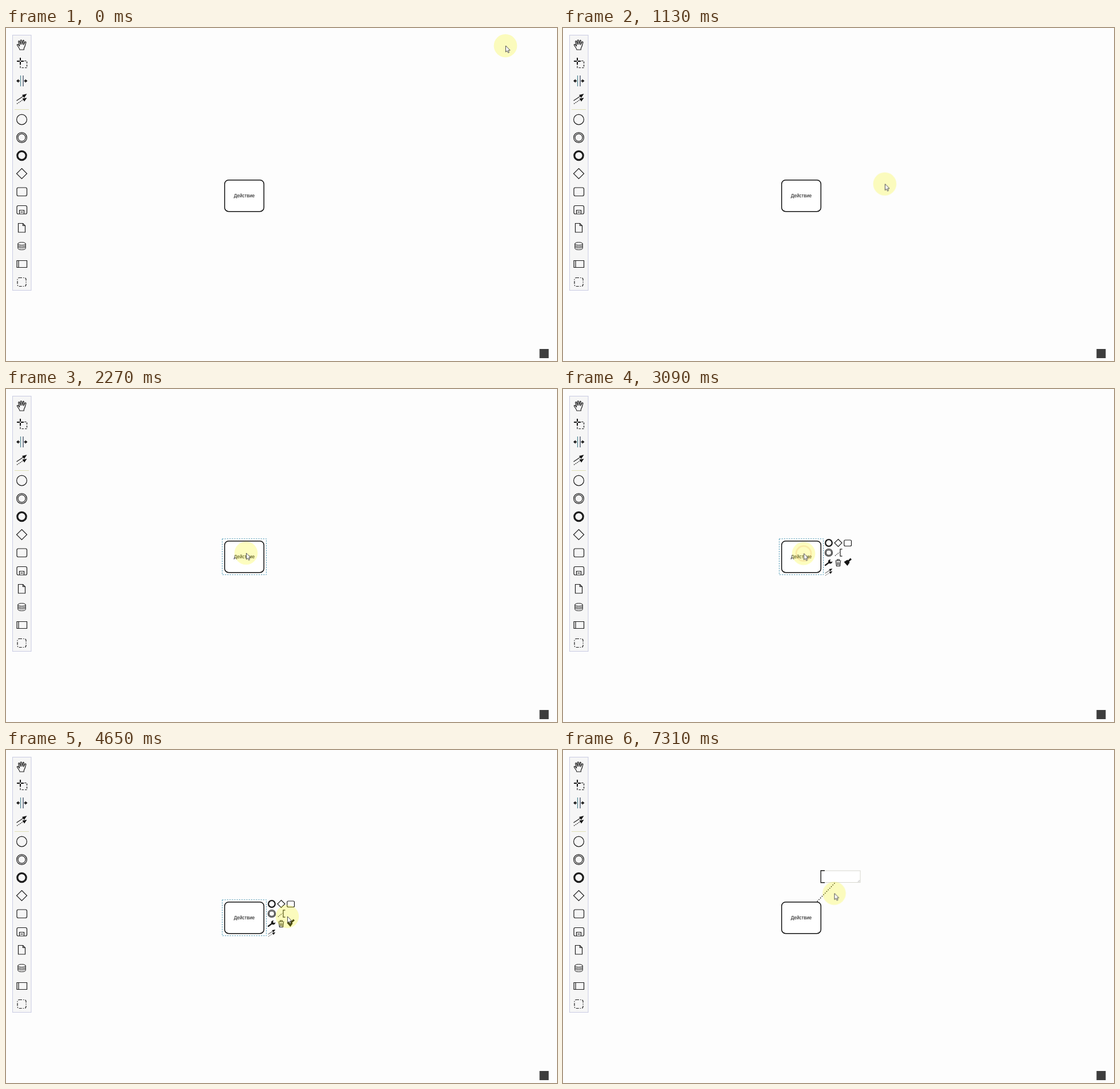
Animation of 962x582 px, one loop 8 s. Source, as an HTML page:

```html
<!DOCTYPE html>
<html lang="ru">
<head>
<meta charset="utf-8">
<title>Диаграмма процесса</title>
<style>
html, body { margin: 0; width: 100%; height: 100%; overflow: hidden; background: #fdfdfd; }
svg { display: block; width: 100%; height: 100%; }
.line { fill: none; stroke: #1c1c1c; stroke-width: 1.2; }
.solid { fill: #151515; stroke: none; }
.label { font: 8.3px "Liberation Sans", Arial, sans-serif; text-anchor: middle; fill: #111; }

#outline, #pad, #note, #caret { animation: 8s step-end infinite; }
#outline { animation-name: outline; }
#pad { animation-name: pad; }
#note { animation-name: note; }
#caret { animation-name: caret; }
#pointer { animation: move 8s linear infinite; }
#ring { animation: click 8s linear infinite; }

@keyframes outline {
  0%, 100% { visibility: hidden; }
  20.625% { visibility: visible; }
  71.25% { visibility: hidden; }
}
@keyframes pad {
  0%, 100% { visibility: hidden; }
  33.125% { visibility: visible; }
  71.25% { visibility: hidden; }
}
@keyframes note {
  0%, 100% { visibility: hidden; }
  71.25% { visibility: visible; }
}
@keyframes caret {
  0%, 100% { opacity: 0; }
  71.25% { opacity: 1; }
  77.9% { opacity: 0; }
  84.5% { opacity: 1; }
  91.1% { opacity: 0; }
}
@keyframes move {
  0%, 3.625% { transform: translate(872px, 31px); }
  5.625% { transform: translate(826px, 104px); }
  7.5% { transform: translate(738px, 207px); }
  9.125%, 10.375% { transform: translate(675px, 256.5px); }
  11.5% { transform: translate(612px, 271px); }
  12.625%, 13.875% { transform: translate(566px, 272px); }
  16.25% { transform: translate(528px, 277px); }
  18.75% { transform: translate(480px, 284px); }
  20.875% { transform: translate(451px, 286.5px); }
  23.125%, 24.375% { transform: translate(435.5px, 283px); }
  26.875% { transform: translate(418px, 286px); }
  29.875%, 38.625% { transform: translate(420px, 287.5px); }
  41.25% { transform: translate(440px, 285px); }
  44.375% { transform: translate(478px, 282px); }
  47.625%, 48.875% { transform: translate(494px, 284px); }
  53.125% { transform: translate(506px, 290px); }
  58.125%, 59.375% { transform: translate(491px, 291px); }
  61.875% { transform: translate(489px, 293px); }
  65% { transform: translate(482px, 287px); }
  68.625%, 80.375% { transform: translate(486px, 290px); }
  83.75% { transform: translate(483px, 272px); }
  89.625%, 90.875% { transform: translate(477px, 251px); }
  91.375%, 100% { transform: translate(473.5px, 250.5px); }
}
@keyframes click {
  0%, 31.6% { transform: scale(.3); opacity: 0; }
  31.7% { transform: scale(.3); opacity: 1; }
  35.5% { transform: scale(1); opacity: 1; }
  38.7% { transform: scale(1); opacity: .8; }
  39.2% { transform: scale(1); opacity: 0; }
  39.3%, 70.1% { transform: scale(.3); opacity: 0; }
  70.2% { transform: scale(.3); opacity: 1; }
  74% { transform: scale(1); opacity: 1; }
  78.6% { transform: scale(1); opacity: .8; }
  79.1%, 100% { transform: scale(1); opacity: 0; }
}
</style>
</head>
<body>
<svg viewBox="0 0 962 582" xmlns="http://www.w3.org/2000/svg">
  <defs>
    <g id="links">
      <path class="line" d="M-9 3L3-5"/>
      <path class="line" stroke-dasharray="1.8 1.4" d="M-8.500 8.500L3 1"/>
      <path class="solid" d="M9-9L4.200-1.700L.5-7zM9-2L4.500 4.500L1-.7z"/>
    </g>
  </defs>

  <g id="palette">
    <rect x="11.500" y="12.500" width="32.500" height="446" fill="#f6f6f6" stroke="#c9cbe2"/>
    <path d="M15 142.500H40" stroke="#dfdfb6"/>

    <g transform="translate(27.5 29.5)">
      <path class="line" stroke-linejoin="round" stroke-width="1" d="M-3.500 8.500C-4 5.500-6.500 3-8 .5C-8.500-1-6.800-1.500-5.800-.2L-3.800 2L-5.800-5.500C-6-7.300-4.300-7.500-3.800-6L-2-.8L-2.200-7.300C-2-9-.3-9-.1-7.300L.5-1L2-7.200C2.500-8.700 4-8.300 3.800-6.700L3-.3L5.500-4.800C6.500-6.200 8-5.200 7.300-3.700C6-.5 6 3 4 5.500L3.700 8.500z"/>
    </g>
    <path d="M25 52V64M19 58H31" stroke="#151515" stroke-width="2"/>
    <rect x="24" y="57" width="2" height="2" fill="#f6f6f6"/>
    <path class="line" stroke-dasharray="3.500 2" d="M32 57.500H36.500V69.500H25V63"/>
    <path d="M25.500 83V102" stroke="#4b8290" stroke-width="1.200"/>
    <path d="M30 83V102" stroke="#303d58" stroke-width="1.200"/>
    <path class="solid" d="M18 92.500L22-3V0zM18 92.500l4-3.300v2.300h2v2h-2v2.300zM37.500 92.500l-4-3.300v2.300h-2v2h2v2.300z" visibility="hidden"/>
    <path class="solid" d="M18 92.500l4-3.300v2.300h2v2h-2v2.300zM37.500 92.500l-4-3.300v2.300h-2v2h2v2.300z"/>
    <use href="#links" x="27.500" y="124"/>

    <g class="line">
      <circle cx="27.500" cy="160" r="8.900"/>
      <circle cx="27.500" cy="191.500" r="8.900"/>
      <circle cx="27.500" cy="191.500" r="6.600"/>
      <circle cx="27.500" cy="223" r="7.700" style="stroke-width:3.200"/>
      <path d="M27.500 245.500L36.500 254.500L27.500 263.500L18.500 254.500z"/>
      <rect x="19" y="279" width="17.500" height="14.500" rx="2.500"/>
      <path d="M23.500 325H21.500a2.500 2.500 0 0 1-2.500-2.500V313a2.500 2.500 0 0 1 2.500-2.500H34a2.500 2.500 0 0 1 2.500 2.500V322.500A2.500 2.500 0 0 1 34 325H23.500V318.500H31.500V325M25.500 321.700H29.500"/>
      <path d="M21.500 341.500H29.500L33.500 345.500V357H21.500zM29.500 341.500V345.500H33.500"/>
      <path d="M20.800 377V385C20.800 388.500 34.200 388.500 34.200 385V377M20.800 379.500C20.800 382.800 34.200 382.800 34.200 379.500M20.800 382C20.800 385.200 34.200 385.200 34.200 382" style="stroke-width:1"/>
      <ellipse cx="27.500" cy="377" rx="6.700" ry="2.500" style="stroke-width:1"/>
      <path d="M19 406.500H36.500V418.500H19zM22 406.500V418.500"/>
      <rect x="20" y="436.500" width="15" height="15" rx="3" stroke-dasharray="5 2 1.500 2"/>
    </g>
  </g>

  <rect x="931.500" y="561" width="16" height="16" fill="#3d3d3d"/>

  <rect x="381.700" y="265.700" width="68.600" height="55" rx="7" fill="#fff" stroke="#111" stroke-width="1.500"/>
  <text class="label" x="416" y="295.800">Действие</text>
  <rect id="outline" x="377.500" y="261.800" width="77" height="62.800" fill="none" stroke="#4897b5" stroke-dasharray="2.100 2.100"/>

  <g id="pad">
    <g class="line">
      <circle cx="464" cy="269" r="5.800" style="stroke-width:2.300"/>
      <path d="M480.500 262.500L487 269L480.500 275.500L474 269z"/>
      <rect x="490.800" y="264" width="12.700" height="10.500" rx="2"/>
      <circle cx="464" cy="286" r="6.500"/>
      <circle cx="464" cy="286" r="4.700"/>
      <path d="M487.500 279.800H484V292.200H487.500"/>
      <path d="M475 291.500L482.500 285.500" stroke-dasharray="1.500 1.500"/>
      <path d="M476.500 301L477.500 309.500H483.500L484.500 301M475.500 300H485.500M478.700 299.500V298H482.300V299.500M479.300 302.500V308M481.700 302.500V308"/>
      <path d="M458 308L466 302" stroke-linecap="round" style="stroke-width:2.200"/>
    </g>
    <path class="solid" d="M470.300 301.200A3.700 3.700 0 1 1 467.500 298L465.800 300.500L467.500 302.500z"/>
    <path class="solid" d="M501.800 295.500L504 298L499.600 301.700L500.500 303.200L496.500 309L490.500 302.300L496.500 298.500L497.800 299.600z"/>
    <use href="#links" transform="translate(464 320) scale(.7)"/>
  </g>

  <g id="note">
    <path d="M474 233L444 264.500" stroke="#111" stroke-width="1.500" stroke-linecap="round" stroke-dasharray=".3 3.600"/>
    <rect x="450.500" y="211" width="68.500" height="20.500" fill="#fff" stroke="#d8d8cf"/>
    <path d="M457 210.700H450.200V231.800H457" fill="none" stroke="#1c1c1c" stroke-width="1.400"/>
    <path d="M515 230.500L518 227.500M517 230.500L518 229.500" stroke="#888" stroke-width=".7"/>
    <path id="caret" d="M456.500 215V224.500" stroke="#333"/>
  </g>

  <g id="pointer">
    <circle r="20.300" fill="#f7f700" fill-opacity=".25"/>
    <circle id="ring" r="13" fill="none" stroke="#efac55" stroke-opacity=".32" stroke-width="2.500"/>
    <path d="M.5 0V11L3 8.700L4.700 12.400L6.500 11.600L4.800 8H8.200z" fill="#fff" stroke="#3a3a3a" stroke-width=".9" stroke-linejoin="round"/>
  </g>
</svg>
</body>
</html>
```
